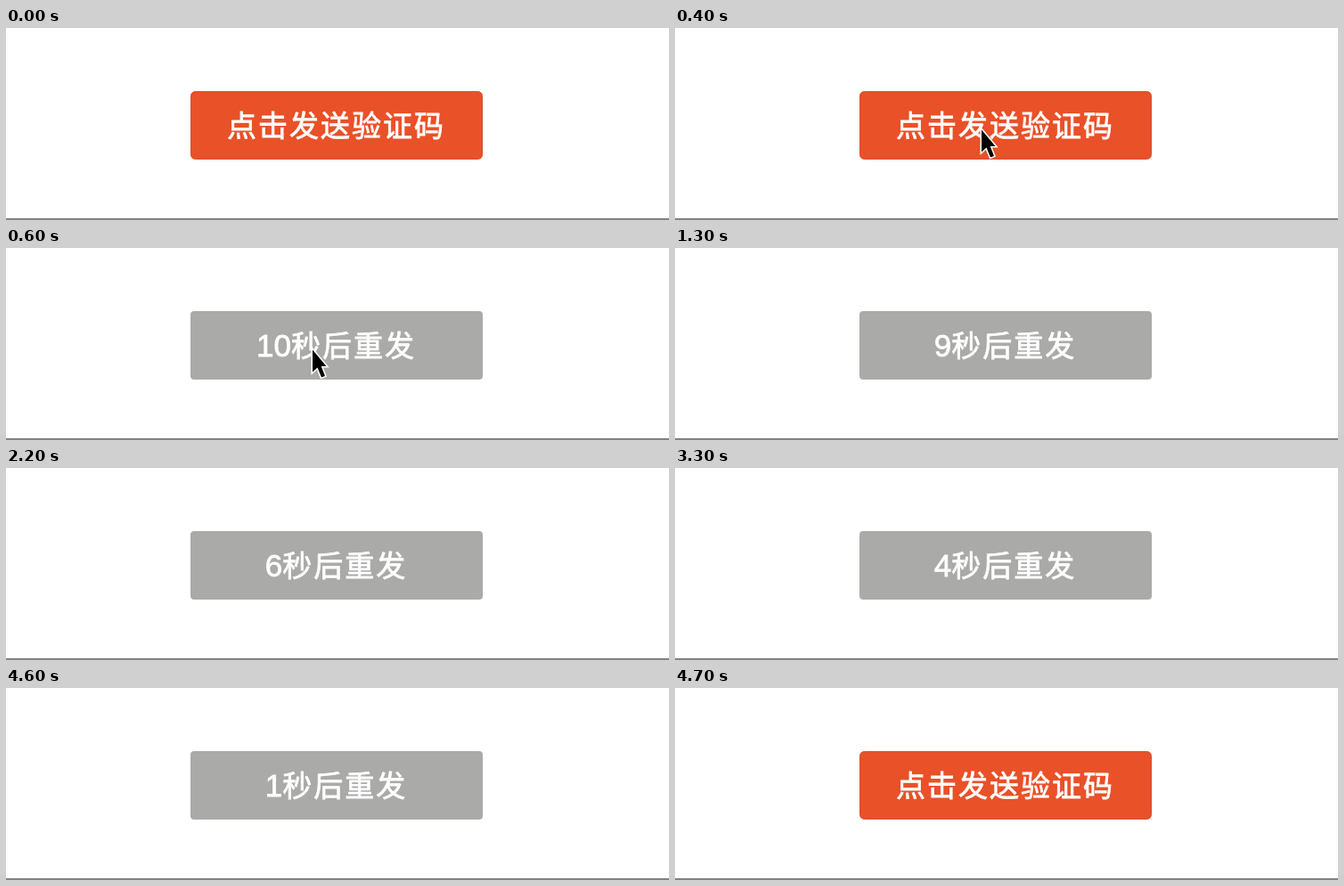
Recreate the animation shown at these times as an HTML page. Size 744 by 216 pixels, loop 5000 ms.

```html
<!DOCTYPE html>
<html lang="zh-CN">
<head>
<meta charset="utf-8">
<title>发送验证码</title>
<style>
  html, body { margin: 0; width: 100%; height: 100%; overflow: hidden; background: #fff; }
  svg { display: block; }
  text {
    font: 33px "Noto Sans CJK SC", "Noto Sans CJK", sans-serif;
    letter-spacing: 2px;
    text-anchor: middle;
    fill: #fff;
    stroke: #fff;
    stroke-width: .8px;
  }
  #num { font: 35px "Liberation Sans", sans-serif; letter-spacing: 0; }
  #cursor { stroke: #fff; stroke-width: 3px; paint-order: stroke; }
</style>
</head>
<body>
<svg width="744" height="216" viewBox="0 0 744 216">
  <rect y="214" width="744" height="2" fill="#828282"/>
  <rect id="button" x="207.5" y="71.5" width="327" height="76"/>
  <text x="370.5" y="122"><tspan id="num"></tspan><tspan id="label"></tspan></text>
  <path id="cursor" d="M0 0V25L5.5 20L10 31L14 29.5L9.7 18.5H15.5Z"/>
</svg>
<script>
const LOOP = 5000;
const $ = id => document.getElementById(id);
const [button, num, label, cursor] = ['button', 'num', 'label', 'cursor'].map($);

// Fill and edge
const looks = {
  idle: ['#e95128', '#d5502c'],
  pressed: ['#7b2917', '#7b2917'],
  waiting: ['#aaaaa8', '#aaaaa8']
};

// Start time, look, seconds left
const steps = [
  [0, 'idle'], [500, 'pressed'],
  [600, 'waiting', 10], [1000, 'waiting', 9], [1400, 'waiting', 8],
  [1800, 'waiting', 7], [2200, 'waiting', 6], [2600, 'waiting', 5],
  [3000, 'waiting', 4], [3500, 'waiting', 3], [3900, 'waiting', 2],
  [4300, 'waiting', 1], [4700, 'idle']
];

// Start time, pointer tip (none while hidden)
const pointer = [[0], [300, 344, 124], [400, 344, 114.5], [700]];

const at = (table, t) => table.findLast(row => row[0] <= t);
let shownStep, shownPointer;

function draw(t) {
  const step = at(steps, t);
  if (step !== shownStep) {
    const [, look, left] = shownStep = step;
    const [fill, edge] = looks[look];
    button.setAttribute('fill', fill);
    button.setAttribute('stroke', edge);
    button.setAttribute('rx', left ? 3 : 5);
    num.textContent = left || '';
    label.textContent = left ? '秒后重发' : '点击发送验证码';
  }
  const spot = at(pointer, t);
  if (spot !== shownPointer) {
    const [, x, y] = shownPointer = spot;
    cursor.style.visibility = x ? 'visible' : 'hidden';
    if (x) cursor.setAttribute('transform', `translate(${x} ${y})`);
  }
}

const start = performance.now();
function tick() {
  draw((performance.now() - start) % LOOP);
  requestAnimationFrame(tick);
}
tick();
</script>
</body>
</html>
```
